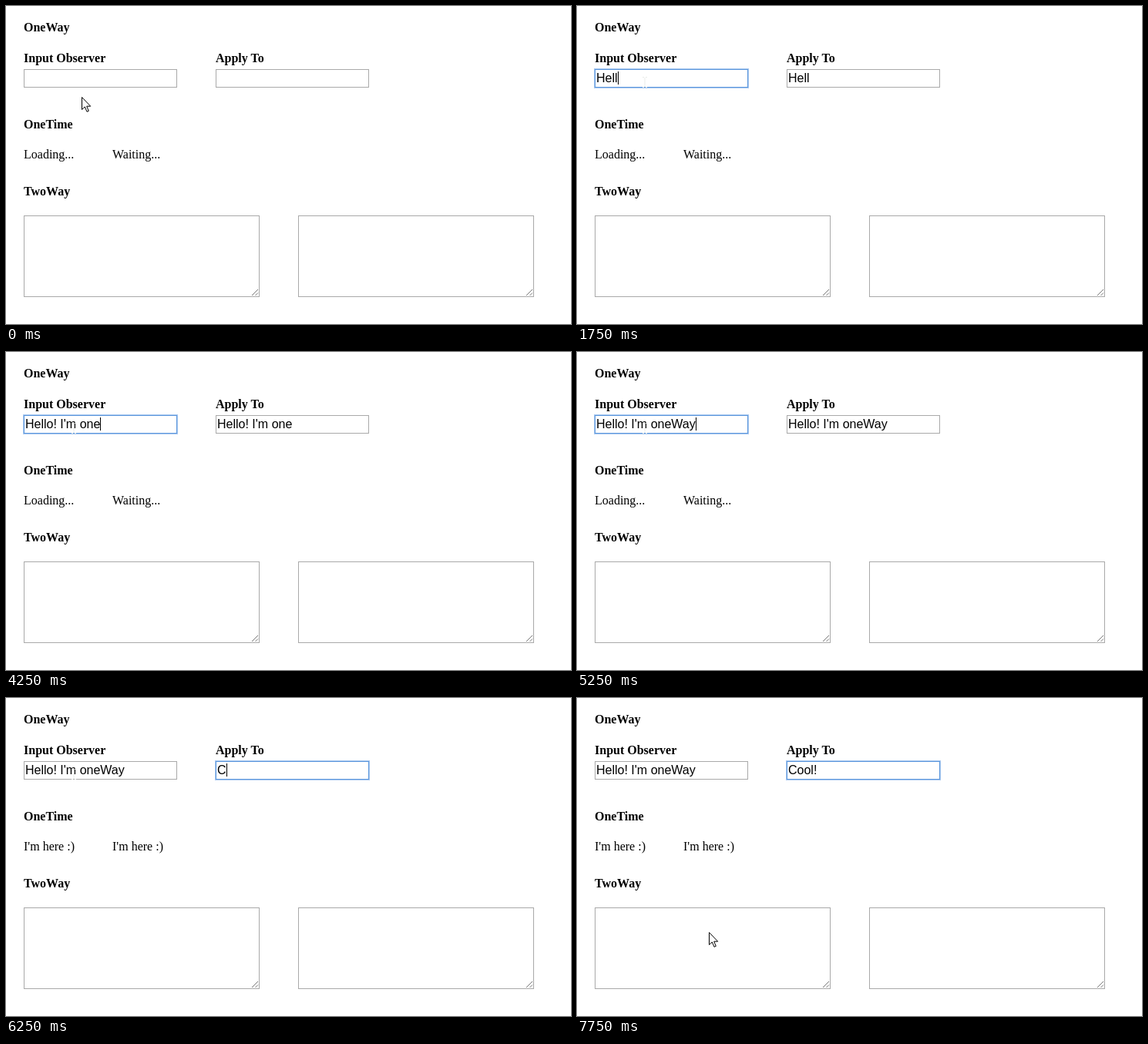
An HTML page that plays this animation: 733x413 px, repeating every 8000 ms.

```html
<!DOCTYPE html>
<html lang="en">
<head>
<meta charset="utf-8">
<title>Data binding demo</title>
<style>
  html, body { margin: 0; width: 100%; height: 100%; overflow: hidden; background: #fff; }
  svg { display: block; width: 733px; height: 413px; }
  text { font: 16px "Liberation Serif", "Times New Roman", serif; fill: #000; white-space: pre; }
  .b { font-weight: bold; }
  .in { font-family: "Liberation Sans", Arial, sans-serif; }
  .box { fill: #fff; stroke: #a9a9a9; }
  .grip { fill: none; stroke: #777; }
  .ring rect { fill: none; stroke: #5c97dd; }
  .ring rect + rect { stroke: #a9c8ef; }
</style>
</head>
<body>
<svg viewBox="0 0 733 413">
  <text class="b" x="23" y="33">OneWay</text>
  <text class="b" x="23" y="73">Input Observer</text>
  <text class="b" x="272" y="73">Apply To</text>
  <text class="b" x="23" y="159">OneTime</text>
  <text class="b" x="23" y="246">TwoWay</text>
  <text id="once1" x="23" y="198"></text>
  <text id="once2" x="138" y="198"></text>

  <rect class="box" x="23.5" y="82.5" width="198" height="23"/>
  <rect class="box" x="272.5" y="82.5" width="198" height="23"/>
  <rect class="box" x="23.5" y="272.5" width="305" height="105"/>
  <rect class="box" x="379.5" y="272.5" width="305" height="105"/>
  <path class="grip" d="M319 376l8-8M323.500 376l3.500-3.500M675 376l8-8M679.500 376l3.500-3.500"/>

  <g id="ring" class="ring">
    <rect x="23.500" y="82.500" width="198" height="23"/>
    <rect x="22.500" y="81.500" width="200" height="25"/>
  </g>
  <rect id="sel" x="274" y="85" height="17" fill="#3390f5"/>
  <text id="left" class="in" x="25" y="99"></text>
  <text id="right" class="in" x="274" y="99"></text>
  <path id="wave" d="M345 101.500H402" fill="none" stroke="#d22c50" stroke-width="1.500" stroke-dasharray="3 1"/>
  <rect id="caret" y="85" width="1" height="17"/>
  <path id="beam" d="M85 92.500h2M89 92.500h2M88 93v12M85 105.500h2M89 105.500h2" fill="none" stroke="#e9ebe9"/>
  <path id="arrow" d="M.5 .5V16.500L4.300 13L7 19.300L9.300 18.300L6.700 12.200H11.700Z" fill="#fff" stroke="#000"/>
</svg>
<script>
const LOOP = 8000;
const $ = id => document.getElementById(id);
const show = (id, on) => $(id).setAttribute("visibility", on ? "visible" : "hidden");
const put = (id, text) => { $(id).textContent = text; };

// Each step lists only what changes at its time.
const steps = [
  { at: 0, left: "", right: "", focus: "", caret: false, arrow: [98, 118], done: false, selected: false },
  { at: 250, arrow: [89, 106] },
  { at: 500, focus: "left", caret: true, arrow: null },
  { at: 1000, caret: false },
  { at: 1250, type: "H", caret: true },
  { at: 1500, type: "Hel" },
  { at: 1750, type: "Hell" },
  { at: 2000, type: "Hello!" },
  { at: 2500, type: "Hello! " },
  { at: 2750, type: "Hello! I" },
  { at: 3000, type: "Hello! I'" },
  { at: 3250, type: "Hello! I'm" },
  { at: 3750, type: "Hello! I'm ", caret: false },
  { at: 4000, caret: true },
  { at: 4250, type: "Hello! I'm one" },
  { at: 5000, type: "Hello! I'm oneWa" },
  { at: 5250, type: "Hello! I'm oneWay" },
  { at: 5750, focus: "right", selected: true, caret: false },
  { at: 6250, right: "C", selected: false, caret: true, done: true },
  { at: 6500, right: "Coo" },
  { at: 6750, right: "Cool" },
  { at: 7000, right: "Cool!" },
  { at: 7500, caret: false, arrow: [97, 110] },
  { at: 7750, arrow: [171, 304] }
];

function stateAt(t) {
  const s = {};
  for (const step of steps) {
    if (step.at > t) break;
    Object.assign(s, step);
    if (step.type) s.left = s.right = step.type;
  }
  return s;
}

function draw(s) {
  put("left", s.left);
  put("right", s.right);
  put("once1", s.done ? "I'm here :)" : "Loading...");
  put("once2", s.done ? "I'm here :)" : "Waiting...");

  show("ring", s.focus);
  $("ring").setAttribute("transform", `translate(${s.focus === "right" ? 249 : 0} 0)`);

  show("sel", s.selected);
  show("wave", s.selected);
  $("right").style.fill = s.selected ? "#fff" : "#000";
  $("sel").setAttribute("width", s.selected ? $("right").getComputedTextLength() : 0);

  show("caret", s.caret);
  if (s.caret) {
    const field = $(s.focus);
    const width = field.textContent ? field.getComputedTextLength() : 0;
    $("caret").setAttribute("x", Math.round(+field.getAttribute("x") + width));
  }

  show("arrow", s.arrow);
  show("beam", !s.arrow);
  if (s.arrow) $("arrow").setAttribute("transform", `translate(${s.arrow})`);
}

const start = performance.now();
let last = -1;
function tick(now) {
  const s = stateAt(Math.max(0, now - start) % LOOP);
  if (s.at !== last) {
    draw(s);
    last = s.at;
  }
  requestAnimationFrame(tick);
}
tick(start);
</script>
</body>
</html>
```
